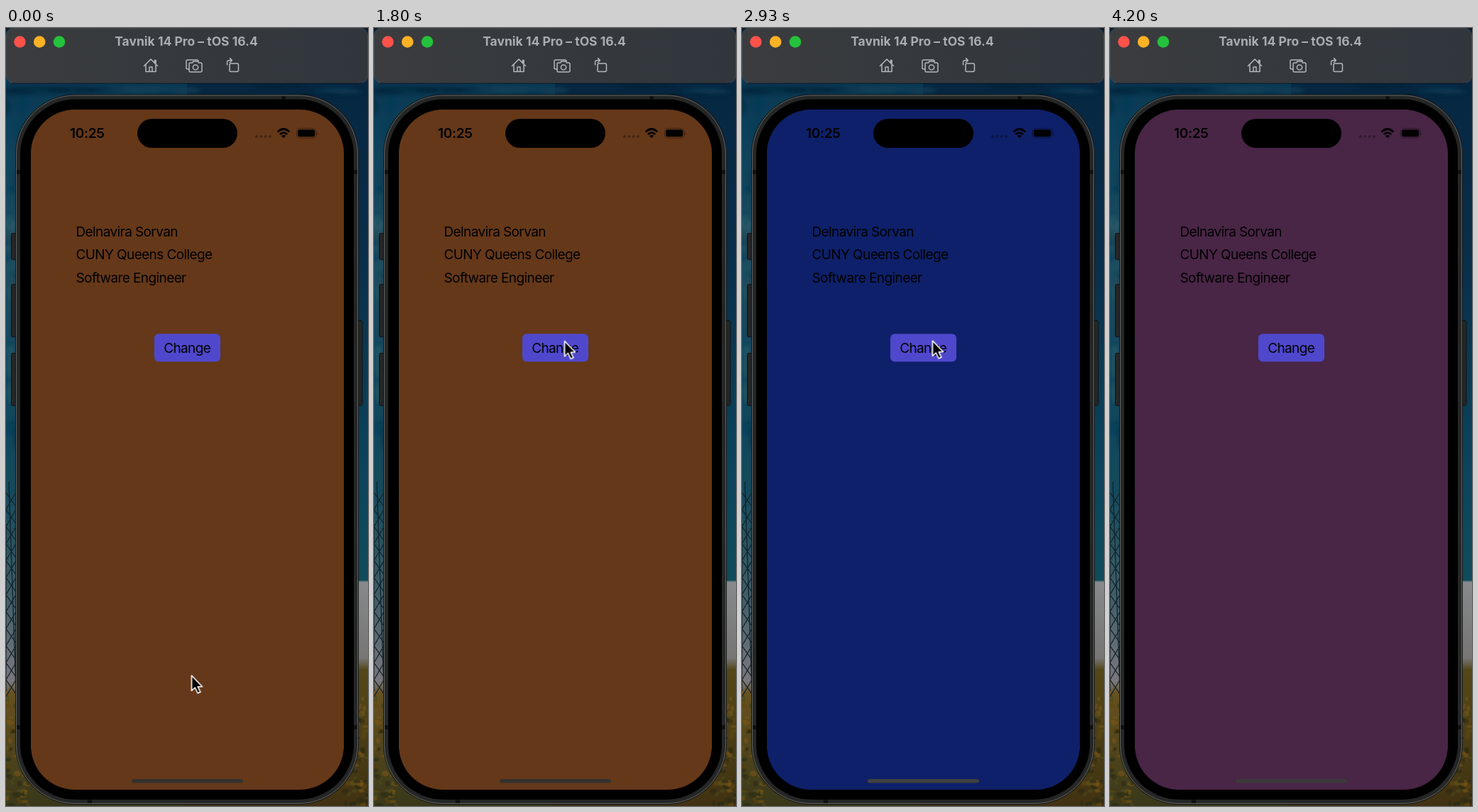
Write an HTML page that moves like this. It is 510x1097 px and loops after 4.23 s.

```html
<!DOCTYPE html>
<html lang="en">
<head>
<meta charset="utf-8">
<title>Colour changer</title>
<style>
  html, body { margin: 0; width: 100%; height: 100%; overflow: hidden; background: #08283f; }
  svg { display: block; width: 100%; height: 100%; }
  text { font-family: Inter, "Open Sans", sans-serif; }
  .label { font-size: 19px; letter-spacing: -.6px; }
  .title { font-size: 17.5px; font-weight: 700; fill: #a9adb2; text-anchor: middle; }
  .clock { font-size: 19px; font-weight: 600; letter-spacing: -.3px; }
  .icon { fill: none; stroke: #b5b8bb; stroke-width: 1.5; stroke-linejoin: round; stroke-linecap: round; }
  .screen { fill: #653819; animation: screen 4.23s step-end infinite; }
  .bar { fill: #32312f; animation: bar 4.23s step-end infinite; }
  .cursor { animation: cursor 4.23s linear infinite; }

  @keyframes screen {
    0% { fill: #653819; }
    47% { fill: #4a2632; }
    56.5% { fill: #400048; }
    65% { fill: #0e2069; }
    75% { fill: #492546; }
  }
  @keyframes bar {
    0% { fill: #32312f; }
    47% { fill: #43353a; }
    56.5% { fill: #404040; }
    75% { fill: #3b3a39; }
  }
  @keyframes cursor {
    0%, 14% { transform: translate(261.5px, 913px); animation-timing-function: ease-in; }
    27.66% { transform: translate(276.5px, 799px); animation-timing-function: ease-out; }
    43%, 84% { transform: translate(268.5px, 441px); animation-timing-function: ease-in-out; }
    95%, 100% { transform: translate(350px, -40px); }
  }
</style>
</head>
<body>
<svg viewBox="0 0 510 1097" preserveAspectRatio="none">
  <defs>
    <linearGradient id="leftSky" x2="0" y2="1">
      <stop offset="0" stop-color="#0a3048"/>
      <stop offset=".12" stop-color="#0b3e58"/>
      <stop offset=".3" stop-color="#1d4d60"/>
      <stop offset=".45" stop-color="#10455c"/>
      <stop offset=".6" stop-color="#154a5c"/>
      <stop offset=".74" stop-color="#456069"/>
      <stop offset=".84" stop-color="#7c777c"/>
      <stop offset=".855" stop-color="#66511f"/>
      <stop offset="1" stop-color="#39381a"/>
    </linearGradient>
    <linearGradient id="rightSky" x2="0" y2="1">
      <stop offset="0" stop-color="#06243d"/>
      <stop offset=".3" stop-color="#082f4b"/>
      <stop offset=".55" stop-color="#0b435c"/>
      <stop offset=".71" stop-color="#104c5d"/>
      <stop offset=".712" stop-color="#87898b"/>
      <stop offset=".81" stop-color="#777675"/>
      <stop offset=".825" stop-color="#544819"/>
      <stop offset="1" stop-color="#403212"/>
    </linearGradient>
    <linearGradient id="toolbar" x2="1">
      <stop offset="0" stop-color="#3b3c3e"/>
      <stop offset=".35" stop-color="#363a3e"/>
      <stop offset="1" stop-color="#31363c"/>
    </linearGradient>
    <filter id="soft"><feGaussianBlur stdDeviation="2.5"/></filter>
  </defs>

  <rect width="255" height="1097" fill="url(#leftSky)"/>
  <rect x="255" width="255" height="1097" fill="url(#rightSky)"/>
  <g id="clouds" filter="url(#soft)"></g>
  <path id="tower" fill="none" stroke="#14232b" stroke-width="1.3"/>
  <g id="grass"></g>

  <!-- window bar -->
  <path d="M0 0H9Q0 0 0 9ZM510 0H501Q510 0 510 9Z" fill="#111a20"/>
  <rect x=".5" y=".5" width="509" height="77" rx="10" fill="url(#toolbar)" stroke="#51565b" stroke-opacity=".6"/>
  <path d="M8 78H502" stroke="#0c151c"/>
  <circle cx="19.5" cy="19.5" r="8.3" fill="#ff5149"/>
  <circle cx="47.2" cy="19.5" r="8.3" fill="#fdb225"/>
  <circle cx="75" cy="19.5" r="8.3" fill="#25c23b"/>
  <text class="title" x="254" y="25">Tavnik 14 Pro – tOS 16.4</text>
  <g class="icon">
    <path d="M194.5 53.5L204 44L213.5 53.5M209.5 49V45.5H211V51M197 52V61.5H211V52M202 61V55H206V61"/>
    <path d="M257 58H256Q254 58 254 56V47Q254 45 256 45H269Q271 45 271 47M260 49H262.5L264 47H270L271.5 49H274Q276 49 276 51V60Q276 62 274 62H260Q258 62 258 60V51Q258 49 260 49Z"/>
    <circle cx="267" cy="55.5" r="3.6"/>
    <path d="M317 50H325.5Q327.5 50 327.5 52V59.5Q327.5 61.5 325.5 61.5H317Q315 61.5 315 59.5V52Q315 50 317 50ZM311.5 52V49Q311.5 45.5 315 45.5H318M315.5 42.5L318.5 45.5L315.5 48.5"/>
  </g>

  <!-- phone -->
  <g fill="#252627" stroke="#111">
    <rect x="7.5" y="289.5" width="9" height="37" rx="2"/>
    <rect x="7.5" y="361.5" width="9" height="74" rx="2"/>
    <rect x="7.5" y="458.5" width="9" height="74" rx="2"/>
    <rect x="493.5" y="412.5" width="8.5" height="120" rx="2"/>
  </g>
  <rect x="13.5" y="94" width="483" height="1000.5" rx="84" fill="#252626" stroke="#111"/>
  <rect x="14.5" y="95" width="481" height="998.5" rx="83" fill="none" stroke="#656666"/>
  <path d="M15 203H20M15 986H20M490 203H495M490 986H495M391 96V101M118 1088V1093" stroke="#111" stroke-width="6"/>
  <rect x="20" y="100.5" width="470" height="987.5" rx="78"/>
  <rect class="screen" x="35" y="115" width="441" height="959" rx="62"/>
  <rect x="185" y="128" width="141" height="41" rx="20.5"/>

  <!-- status bar -->
  <text class="clock" x="90" y="155">10:25</text>
  <g fill-opacity=".3">
    <circle cx="353" cy="153" r="2"/>
    <circle cx="359.3" cy="153" r="2"/>
    <circle cx="365.6" cy="153" r="2"/>
    <circle cx="371.9" cy="153" r="2"/>
  </g>
  <path d="M382.7 146.5Q391 138.5 399.3 146.5M385.8 150Q391 145.2 396.2 150" fill="none" stroke="#000" stroke-width="2.7"/>
  <path d="M391 155.3L387.8 152.2Q391 149.6 394.2 152.2Z"/>
  <rect x="409.5" y="141.5" width="27.5" height="13.5" rx="4.3" fill="none" stroke="#000" stroke-opacity=".4"/>
  <rect x="411.2" y="143.2" width="24" height="10" rx="2.8"/>
  <path d="M438.2 146V151Q440 148.5 438.2 146Z" fill-opacity=".5"/>

  <!-- app -->
  <g class="label">
    <text x="98.5" y="293.7">Delnavira Sorvan</text>
    <text x="98.5" y="326.3">CUNY Queens College</text>
    <text x="98.5" y="358.9">Software Engineer</text>
    <rect x="209" y="431.3" width="93" height="39.2" rx="6" fill="#4f48cc"/>
    <text x="255.2" y="457.8" text-anchor="middle">Change</text>
  </g>
  <rect class="bar" x="177" y="1059" width="157" height="5.5" rx="2.75"/>

  <path class="cursor" d="M0 0V21.5L4.8 17L8.6 25L12.4 23.3L8.8 15.8H15Z" stroke="#fff" stroke-width="1.6" stroke-linejoin="round"/>
</svg>
<script>
  let seed = 11;
  const random = () => (seed = seed * 16807 % 2147483647) / 2147483647;
  const pick = list => list[Math.floor(random() * list.length)];
  const edgeX = () => random() < .5 ? random() * 34 : 476 + random() * 34;

  function blobs(id, count, place, rx, ry, colours, opacity) {
    const group = document.getElementById(id);
    for (let i = 0; i < count; i++) {
      const blob = document.createElementNS(group.namespaceURI, 'ellipse');
      const [cx, cy] = place();
      const look = { cx, cy, rx: rx * (.5 + random()), ry: ry * (.5 + random()), fill: pick(colours), opacity };
      for (const key in look) blob.setAttribute(key, look[key]);
      group.append(blob);
    }
  }

  blobs('clouds', 26, () => [random() * 30, 100 + random() * 500], 9, 12, ['#08283d', '#2b5b69', '#0b3b55'], .55);
  blobs('clouds', 14, () => [random() * 510, 80 + random() * 14], 32, 4, ['#052036', '#10405a', '#0a3550'], .5);
  blobs('grass', 170, () => [edgeX(), 945 + random() * 152], 4, 3, ['#765719', '#292a14', '#4f4a1b', '#60460f'], .6);

  let lattice = 'M4 640L14 935M0 700V935';
  for (let y = 655; y < 930; y += 24) lattice += `M0 ${y}L14 ${y + 20}M14 ${y}L0 ${y + 24}`;
  document.getElementById('tower').setAttribute('d', lattice);
</script>
</body>
</html>
```
